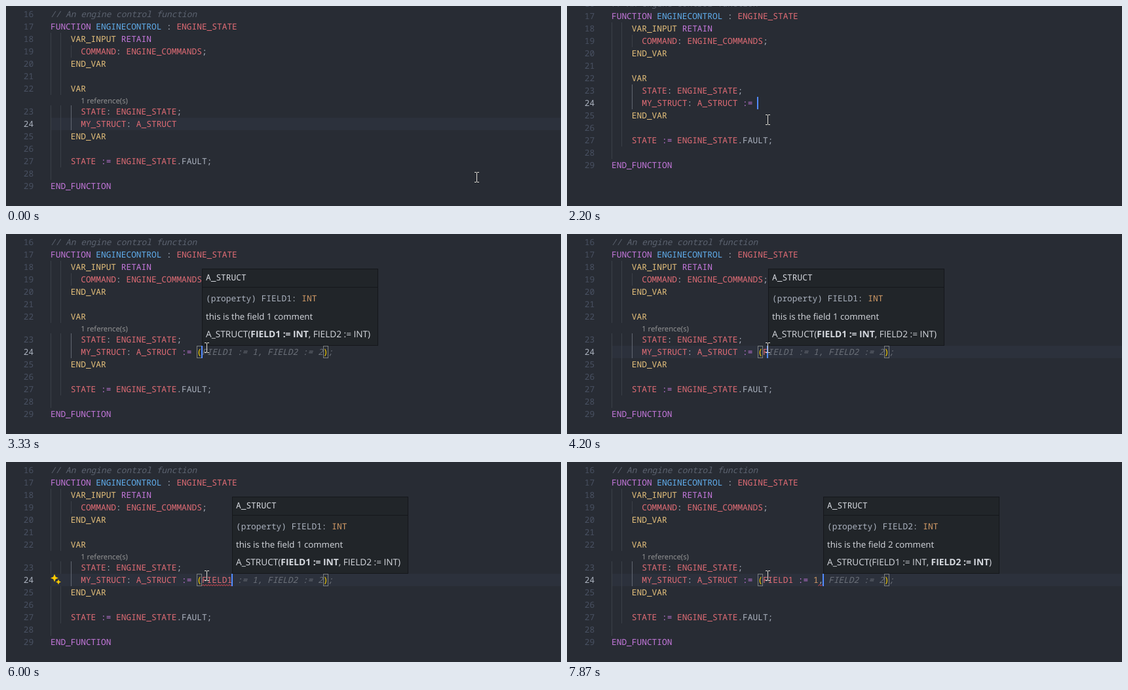
Animation, 847 px wide and 306 px high, one loop 8000 ms. Source, as an HTML page with a canvas:

```html
<!DOCTYPE html>
<html lang="en">
<head>
<meta charset="utf-8">
<title>Code editor</title>
<style>
  html, body { margin: 0; width: 847px; height: 306px; overflow: hidden; background: #282c34; }
  canvas { display: block; }
</style>
</head>
<body>
<canvas id="stage" width="847" height="306"></canvas>
<script>
const ctx = document.getElementById('stage').getContext('2d', { alpha: false });
const W = 847, H = 306, LOOP = 8000;
const LEFT = 68, CELL = 7.697, ROW = 19, LENS = 16;
const MONO = '"Noto Sans Mono", "DejaVu Sans Mono", monospace';
const SANS = '"Open Sans", "Noto Sans", sans-serif';
const C = {
  bg: '#282c34', band: '#2c313c', guide: '#3b4048', guideOn: '#626772',
  num: '#495162', text: '#abb2bf', bright: '#d7dae0', ghost: '#6b7079',
  note: '#5c6370', key: '#c678dd', fn: '#61afef', name: '#e06c75',
  type: '#e5c07b', digit: '#d19a66', lens: '#999999', gold: '#ffd700',
  panel: '#212529', edge: '#15171b', caret: '#528bff', error: '#f04c50',
  bracket: '#7b7f80', spark: '#ffcc00', mouse: '#e2dfd6'
};

// First entry is the indent, the rest are colour and text pairs.
const lines = [
  [0, 'note', '// An engine control function'],
  [0, 'key', 'FUNCTION ', 'fn', 'ENGINECONTROL', 'text', ' : ', 'name', 'ENGINE_STATE'],
  [4, 'type', 'VAR_INPUT ', 'key', 'RETAIN'],
  [6, 'name', 'COMMAND', 'text', ': ', 'name', 'ENGINE_COMMANDS', 'text', ';'],
  [4, 'type', 'END_VAR'],
  [4],
  [4, 'type', 'VAR'],
  [6, 'name', 'STATE', 'text', ': ', 'name', 'ENGINE_STATE', 'text', ';'],
  [6, 'name', 'MY_STRUCT', 'text', ': ', 'name', 'A_STRUCT'],
  [4, 'type', 'END_VAR'],
  [4],
  [4, 'name', 'STATE', 'key', ' := ', 'name', 'ENGINE_STATE', 'text', '.FAULT;'],
  [2],
  [0, 'key', 'END_FUNCTION']
];
const FIRST = 16, LENS_LINE = 7, EDIT_LINE = 8, EDIT_COL = 26;

const typing = ':= (FIELD1 := 1,';
const typingColors = [
  ['key', 2], ['text', 1], ['gold', 1], ['name', 6], ['text', 1],
  ['key', 2], ['text', 1], ['digit', 1], ['text', 1]
].flatMap(([color, n]) => Array(n).fill(color));
const keyTimes = [1730, 1800, 2130, 2330, 4200, 4470, 4530, 4600, 4670,
  6000, 6400, 6670, 6870, 7070, 7330, 7670];
const suggestion = 'FIELD1 := 1, FIELD2 := 2';
const words = ['FAULT', 'FIELD1', 'FIELD2', 'FUNCTION', 'field', 'function'];

const between = (t, a, b) => t >= a && t < b;
const colX = col => LEFT + col * CELL;

function rect(x, y, w, h, color) {
  ctx.fillStyle = color;
  ctx.fillRect(x, y, w, h);
}

function mono(text, x, y, color, style = '') {
  ctx.font = `${style} 12.83px ${MONO}`;
  ctx.fillStyle = color;
  [...text].forEach((ch, i) => ctx.fillText(ch, x + i * CELL, y));
  return x + text.length * CELL;
}

function sans(text, x, y, size, color, weight = 400) {
  ctx.font = `${weight} ${size}px ${SANS}`;
  ctx.fillStyle = color;
  ctx.fillText(text, x, y);
  return x + ctx.measureText(text).width;
}

function panel(x, y, w, h) {
  rect(x, y, w, h, C.edge);
  rect(x + 1, y + 1, w - 2, h - 2, C.panel);
}

function squiggle(col, count, top) {
  const x0 = colX(col), x1 = x0 + count * CELL;
  ctx.beginPath();
  for (let x = x0, i = 0; x <= x1; x += 2, i++) {
    ctx.lineTo(x, top + (i % 2 ? 16.5 : 18.5));
  }
  ctx.strokeStyle = C.error;
  ctx.lineWidth = 1;
  ctx.stroke();
}

function star(x, y, r) {
  ctx.beginPath();
  for (let i = 0; i < 8; i++) {
    const a = i * Math.PI / 4, d = i % 2 ? r * 0.42 : r;
    ctx.lineTo(x + d * Math.cos(a), y + d * Math.sin(a));
  }
  ctx.closePath();
  ctx.fillStyle = C.spark;
  ctx.fill();
}

function bracket(ch, col, top) {
  ctx.strokeStyle = C.bracket;
  ctx.lineWidth = 1;
  ctx.strokeRect(Math.round(colX(col)) + 0.5, top + 0.5, 7, 18);
  mono(ch, colX(col), top + 14, C.gold);
}

function drawLines(topOf, hasLens) {
  lines.forEach(([indent, ...parts], i) => {
    const top = topOf(i), base = top + 14;
    for (let g = 0; g < indent / 2; g++) {
      const active = g === 2 && i >= LENS_LINE;
      rect(Math.round(colX(g * 2)), top, 1, ROW, active ? C.guideOn : C.guide);
    }
    mono(String(FIRST + i), 26.8, base, i === EDIT_LINE ? C.text : C.num);
    let x = colX(indent);
    for (let k = 0; k < parts.length; k += 2) {
      x = mono(parts[k + 1], x, base, C[parts[k]], parts[k] === 'note' ? 'italic' : '');
    }
  });
  if (hasLens) sans('1 reference(s)', colX(6), topOf(LENS_LINE) - 3.5, 11.3, C.lens);
}

function drawEdit(t, n, top) {
  const base = top + 14, caretCol = EDIT_COL + n;
  for (let i = 0; i < n; i++) {
    if (typing[i] === '(') bracket('(', EDIT_COL + i, top);
    else mono(typing[i], colX(EDIT_COL + i), base, C[typingColors[i]]);
  }
  if (n >= 4) {
    const hasGhost = t >= 2800;
    const rest = hasGhost ? suggestion.slice(n - 4) : '';
    const end = mono(rest, colX(caretCol), base, C.ghost, 'italic');
    bracket(')', caretCol + rest.length, top);
    if (hasGhost) mono(';', end + CELL, base, C.ghost, 'italic');
  }
  if (between(t, 4330, 6930)) squiggle(30, Math.min(n - 4, 6), top);
  if (t >= 7870) squiggle(41, 1, top);

  const caretOff = t < 930 || between(t, 1470, 1730) ||
    between(t, 3800, 4200) || between(t, 5200, 5670);
  if (!caretOff) rect(Math.round(colX(caretCol) - 1.2), top, 2, ROW, C.caret);

  if (between(t, 5070, 7670)) {
    rect(LEFT, top, 16, ROW, C.band);
    star(74, top + 6.5, 6);
    star(80, top + 12.5, 4);
  }
}

function drawHint(x, y, second) {
  const tx = x + 6;
  panel(x, y, 269, 118);
  mono('A_STRUCT', tx, y + 18, C.bright);
  rect(x, y + 28, 269, 1, C.edge);
  const end = mono(`(property) FIELD${second ? 2 : 1}: `, tx, y + 50, C.text);
  mono('INT', end, y + 50, C.digit);
  sans(`this is the field ${second ? 2 : 1} comment`, tx, y + 78, 13.25, C.bright);
  const parts = [['A_STRUCT('], ['FIELD1 := INT', !second], [', '], ['FIELD2 := INT', second], [')']];
  parts.reduce((px, [text, bold]) =>
    sans(text, px, y + 105, bold ? 13.8 : 13.65, C.bright, bold ? 700 : 400), tx);
}

function drawWords(x, y, prefix) {
  const list = words.filter(w => w.toUpperCase().startsWith(prefix));
  panel(x, y, 269, list.length * ROW + 4);
  list.forEach((word, i) => {
    const top = y + 1 + i * ROW, base = top + 14;
    if (!i) rect(x + 1, top, 267, ROW, '#2c313a');
    sans('abc', x + 4, base - 0.5, 9, C.bright, 600);
    rect(x + 4, base + 1, 14, 1, C.text);
    const end = mono(word.slice(0, prefix.length), x + 23, base, C.bright, 'bold');
    mono(word.slice(prefix.length), end, base, C.bright);
  });
}

function drawMouse(t) {
  const step = Math.max(0, Math.min(11, Math.floor((t - 70) / 66) + 1)) / 11;
  const p = step * step * (3 - 2 * step);
  const x = Math.round(718 - 412 * p), y = Math.round(262 - 88 * p);
  rect(x, y - 7, 1, 14, C.mouse);
  for (const dy of [-8, 7]) {
    rect(x - 3, y + dy, 3, 1, C.mouse);
    rect(x + 1, y + dy, 3, 1, C.mouse);
  }
}

function draw(t) {
  const hasLens = !between(t, 2130, 3200);
  const scroll = hasLens ? 0 : LENS;
  const topOf = i => 3 + i * ROW - scroll + (hasLens && i >= LENS_LINE ? LENS : 0);
  const top = topOf(EDIT_LINE);
  const n = keyTimes.filter(k => t >= k).length;
  const caretX = Math.round(colX(EDIT_COL + n));

  ctx.textRendering = 'geometricPrecision';
  rect(0, 0, W, H, C.bg);
  if (!between(t, 2130, 4200)) rect(LEFT, top, W - LEFT, ROW, C.band);
  drawLines(topOf, hasLens);
  drawEdit(t, n, top);
  if (t >= 2870) drawHint(caretX, top - 118, t >= 7730);
  if (between(t, 4330, 6000)) drawWords(caretX, top + ROW, typing.slice(4, n));
  drawMouse(t);
}

const start = performance.now();
function frame() {
  draw((performance.now() - start) % LOOP);
  requestAnimationFrame(frame);
}
frame();
</script>
</body>
</html>
```
